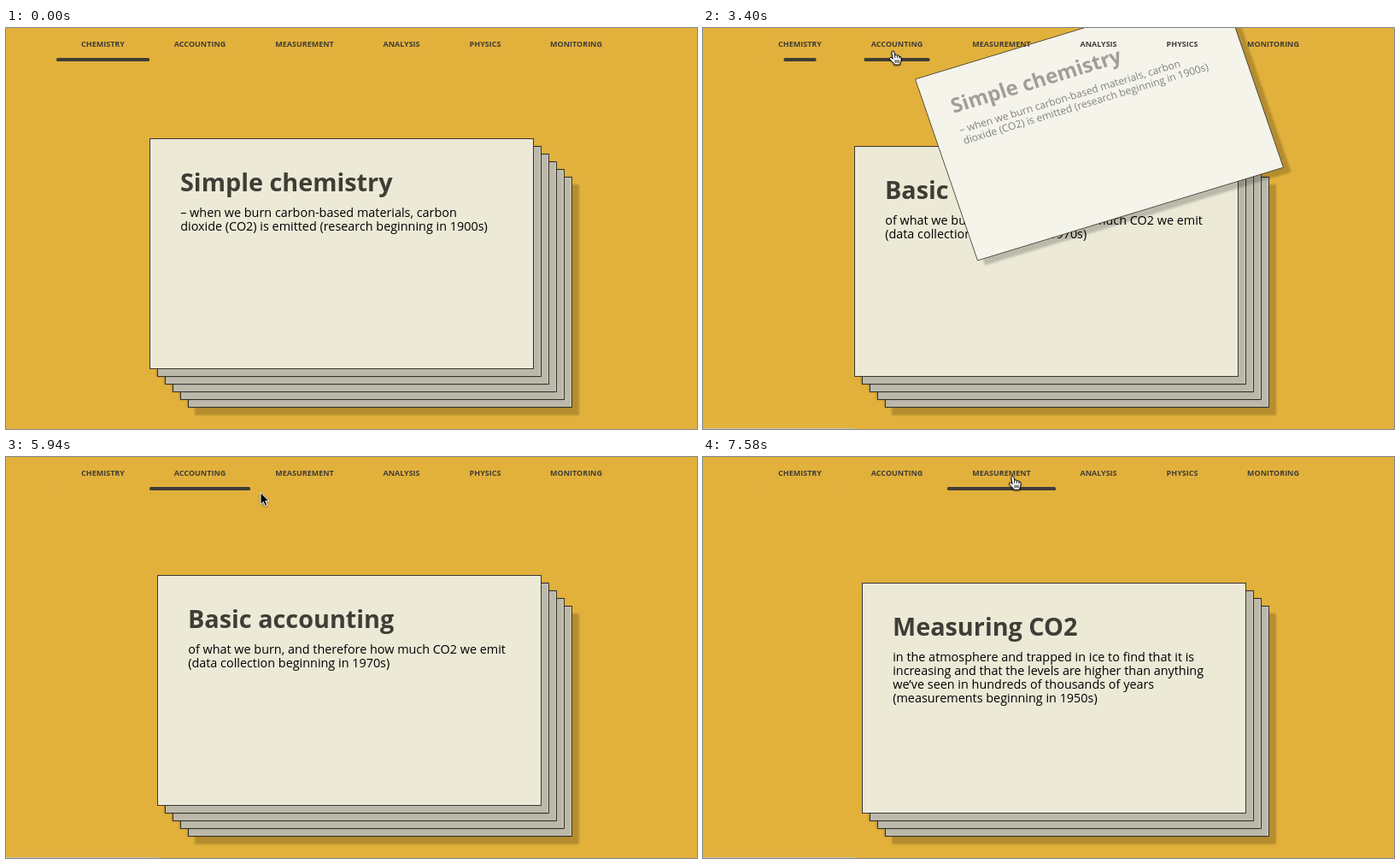
An HTML page for the animation above (8 s loop, 809 by 469 pixels).

```html
<!DOCTYPE html>
<html lang="en">
<head>
<meta charset="utf-8">
<title>Card stack</title>
<style>
  html, body { margin: 0; width: 100%; height: 100%; overflow: hidden; background: #e2b13c; }
  svg { display: block; width: 809px; height: 469px; }
  text { font-family: "Open Sans", "Noto Sans", sans-serif; }
  .tab { font-size: 9px; font-weight: 700; fill: #403d36; text-anchor: middle; }
  .title { font-size: 28.8px; font-weight: 700; fill: #403d36; }
  .body { font-size: 14.4px; fill: #000; }
  #cursor { filter: drop-shadow(0 1px 1px rgba(0, 0, 0, .4)); }
</style>
</head>
<body>
<svg id="stage" viewBox="0 0 809 469">
  <defs>
    <filter id="soft" x="-5%" y="-5%" width="110%" height="110%"><feGaussianBlur stdDeviation="1"/></filter>
  </defs>
  <rect width="809" height="469" fill="#e2b13c"/>
  <g id="cards"></g>
  <g id="nav"></g>
  <rect id="status" y="468" width="178" height="1" fill="#cfc6ae"/>
  <g id="cursor">
    <path id="arrow" d="M1 1.5V15.5L4.3 12.4 6.4 17.3 8.8 16.3 6.8 11.6H11Z" fill="#000" stroke="#fff"/>
    <g id="hand" transform="translate(-5 0)" stroke="#000" stroke-linejoin="round" stroke-linecap="round">
      <path fill="#fff" d="M4.6 9.2L3.4 2.4Q3.2 .7 4.6 .5T6.4 1.8L7.2 5.6Q7.6 4.6 8.7 4.8T9.9 6Q10.6 5.2 11.5 5.6T12.4 7Q14.3 6.5 14.5 8.4V11Q14.2 13.4 13.2 14.6V16.5H6.2V15.2Q3.6 12.6 1.4 10.2 .4 8.6 1.6 8 3 7.6 4.6 9.2Z"/>
      <path fill="none" stroke-width=".9" d="M7.2 6V8.4M9.9 6.4V8.4M12.4 7.2V8.8M7.6 11V14M9.6 11V14M11.6 11V14"/>
    </g>
  </g>
</svg>
<script>
const LOOP = 8000, STEP = 148.5, CARD_W = 450, CARD_H = 270;
const $ = id => document.getElementById(id);

function add(parent, tag, attrs, text) {
  const el = document.createElementNS("http://www.w3.org/2000/svg", tag);
  for (const name in attrs) el.setAttribute(name, attrs[name]);
  if (text) el.textContent = text;
  return parent.appendChild(el);
}

const show = (el, on) => el.setAttribute("visibility", on ? "visible" : "hidden");

// Navigation: label, left and right edge of each tab
const tabs = [
  ["CHEMISTRY", 59, 168], ["ACCOUNTING", 168, 286], ["MEASUREMENT", 286, 413],
  ["ANALYSIS", 413, 513], ["PHYSICS", 513, 609], ["MONITORING", 608, 727]
].map(([label, left, right]) => {
  const mid = (left + right) / 2;
  add($("nav"), "text", { x: mid, y: 22, class: "tab" }, label);
  const bar = add($("nav"), "rect", { y: 35, height: 4, rx: 1.5, fill: "#403d36" });
  return { mid, width: right - left, bar };
});

const contents = [
  ["Simple chemistry", "– when we burn carbon-based materials, carbon",
    "dioxide (CO2) is emitted (research beginning in 1900s)"],
  ["Basic accounting", "of what we burn, and therefore how much CO2 we emit",
    "(data collection beginning in 1970s)"],
  ["Measuring CO2", "in the atmosphere and trapped in ice to find that it is",
    "increasing and that the levels are higher than anything",
    "we’ve seen in hundreds of thousands of years", "(measurements beginning in 1950s)"],
  [], [], []
];

function makeCard(index) {
  const g = add($("cards"), "g", {});
  const [title, ...lines] = contents[index];
  add(g, "rect", { x: 8, y: 9, width: CARD_W, height: CARD_H, opacity: .2, filter: "url(#soft)" });
  add(g, "rect", { x: .5, y: .5, width: CARD_W - 1, height: CARD_H - 1, fill: "#ece9d7", stroke: "#393731" });
  if (title) add(g, "text", { x: 36, y: 62, class: "title" }, title);
  lines.forEach((line, i) => add(g, "text", { x: 36.2, y: 92 + 16 * i, class: "body" }, line));
  const veil = add(g, "rect", { x: 1, y: 1, width: CARD_W - 2, height: CARD_H - 2, fill: "#fff", opacity: .5 });
  return { g, veil };
}

const cards = [];
for (let i = contents.length - 1; i >= 0; i--) cards[i] = makeCard(i);

// Keys are [step, ...values]
function sample(keys, step) {
  if (step <= keys[0][0]) return keys[0].slice(1);
  const next = keys.findIndex(key => key[0] > step);
  if (next < 0) return keys[keys.length - 1].slice(1);
  const a = keys[next - 1], b = keys[next], u = (step - a[0]) / (b[0] - a[0]);
  return a.slice(1).map((v, i) => v + (b[i + 1] - v) * u);
}

// [step, dx, dy, tilt of the top edge, tilt of the side edge, scale]
const flights = [
  [[22, 0, 0, 0, 0, 1], [23, 71, -152.5, 16.9, 19, .833],
    [24, 259, -427, 24.5, 27.6, .758], [25, 500, -800, 26, 29, .75]],
  [[47, 0, 0, 0, 0, 1], [48, 35, 4, 2, 2.6, .94], [49, 161, 13.5, 4.8, 6.25, .861],
    [50, 480, 13, 5.5, 7.2, .84], [51, 900, 13, 5.5, 7.2, .84]]
];

const cursorPath = [
  [1, 749, 80], [3, 500, 48], [5, 330, 22], [8, 240, 11], [12, 226, 21], [16, 226, 21],
  [18, 222.5, 26.5], [30, 222.5, 26.5], [31, 223, 26.5], [33, 223, 26.5],
  [40, 297, 40], [41, 309, 39], [46, 362.5, 22]
];

// cubic-bezier(.25, .1, .25, 1)
function ease(x) {
  if (x <= 0) return 0;
  if (x >= 1) return 1;
  let low = 0, high = 1, s;
  for (let i = 0; i < 20; i++) {
    s = (low + high) / 2;
    if (.75 * s * (1 - s) + s ** 3 < x) low = s; else high = s;
  }
  return .3 * s * (1 - s) ** 2 + 3 * s * s * (1 - s) + s ** 3;
}

function placeCard({ g, veil }, index, step) {
  const keys = flights[index];
  const [dx, dy, top, side, scale] = keys ? sample(keys, step) : [0, 0, 0, 0, 1];
  const a = top * Math.PI / 180, b = side * Math.PI / 180;
  const cx = 168 + 9 * index + CARD_W / 2 + dx, cy = 129 + 9 * index + CARD_H / 2 + dy;
  const m = [Math.cos(a), -Math.sin(a), Math.sin(b), Math.cos(b)].map(v => v * scale);
  g.setAttribute("transform", `matrix(${m} ${cx} ${cy}) translate(${-CARD_W / 2} ${-CARD_H / 2})`);
  g.setAttribute("display", keys && step >= keys[keys.length - 1][0] ? "none" : "inline");
  show(veil, keys && step > keys[0][0]);
}

function render(time) {
  const step = Math.floor(time / STEP + .12), t = step * STEP;
  cards.forEach((card, i) => placeCard(card, i, step));

  const first = ease((t - 3260) / 410), second = ease((t - 7037) / 410);
  const shares = [1 - first, first * (1 - second), second];
  tabs.forEach(({ mid, width, bar }, i) => {
    const w = width * (shares[i] || 0);
    bar.setAttribute("x", mid - w / 2);
    bar.setAttribute("width", w);
  });

  const [x, y] = sample(cursorPath, step);
  const pointing = step >= 18 && step <= 36 || step >= 44;
  $("cursor").setAttribute("transform", `translate(${x} ${y})`);
  show($("arrow"), step >= 1 && !pointing);
  show($("hand"), pointing);
  show($("status"), step >= 19);
}

const start = performance.now();
function tick() {
  render((performance.now() - start) % LOOP);
  requestAnimationFrame(tick);
}
tick();
</script>
</body>
</html>
```
